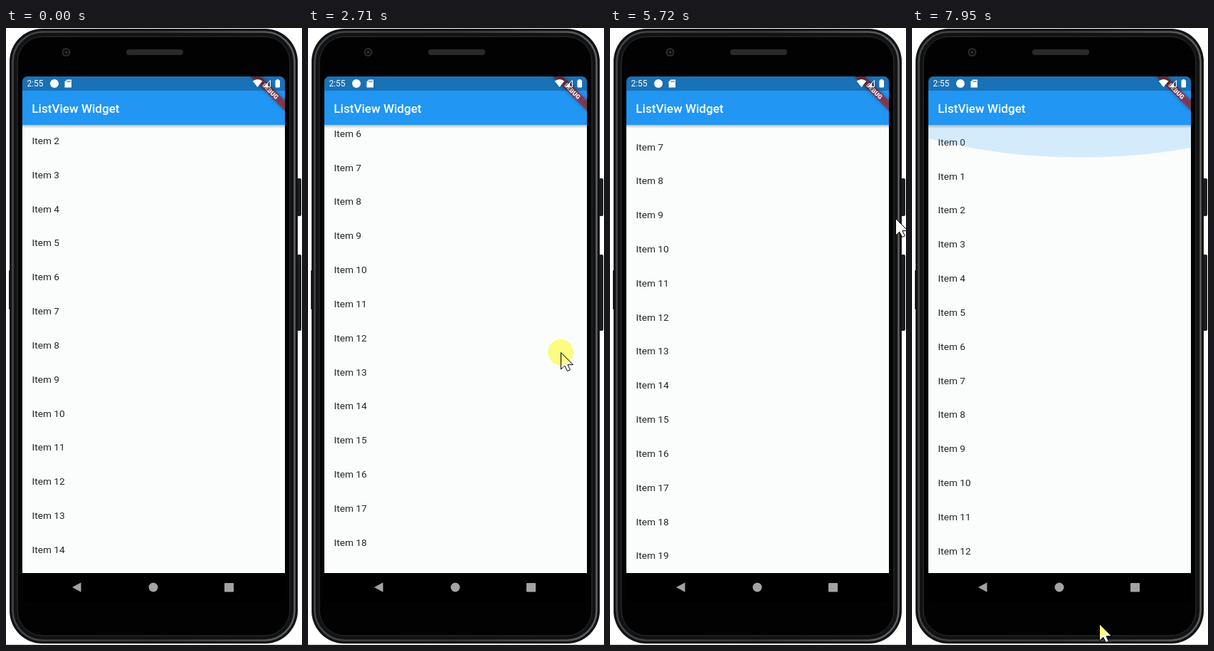
Write an HTML page with a canvas that moves like this. It is 416x866 px and loops after 8 s.

```html
<!DOCTYPE html>
<html lang="en">
<head>
<meta charset="utf-8">
<title>ListView Widget</title>
<style>
  html, body { margin: 0; width: 100%; height: 100%; overflow: hidden; background: #fff; }
  canvas { display: block; }
</style>
</head>
<body>
<canvas id="stage" width="416" height="866"></canvas>
<script>
const ctx = document.getElementById('stage').getContext('2d');
const LOOP = 8000, TICK = 77;
const DP = 0.854;
const LEFT = 23, RIGHT = 392, WIDTH = RIGHT - LEFT;
const TOP = 68, LIST_TOP = 136, LIST_BOTTOM = 765;
const PITCH = 47.83, ITEMS = 20, MAX_SCROLL = 328;
const SLOP = 15.6, LAG = 40;

// Pointer paths: [time, x, y]; each one is visible from its first to its last time.
const passing = [[70, 378, 839], [115, 390, 828], [160, 420, 815]];
const swipeUp = [
  [305, 404, 709], [390, 385, 704], [470, 366, 699], [545, 358, 697], [2010, 358, 697],
  [2170, 356, 675], [2330, 355, 640], [2480, 355, 585], [2630, 355, 505], [2710, 355, 455],
  [2780, 366, 384], [2860, 376, 302], [2940, 388, 215], [3020, 400, 125], [3100, 424, 60]
];
const swipeDown = [
  [5705, 401, 267], [5730, 401, 267], [5785, 406, 272], [5945, 398, 262], [6100, 372, 232],
  [6245, 358, 220], [6550, 358, 220], [6640, 352, 240], [6710, 330, 298], [6790, 303, 365],
  [6870, 293, 415], [6950, 290, 460], [7020, 283, 528], [7100, 270, 590], [7180, 265, 658],
  [7250, 264, 720], [7330, 263, 781], [7410, 262, 826], [7480, 262, 833], [7640, 262, 834],
  [7800, 263, 836], [8000, 263, 836]
];

const clamp = (v, lo, hi) => Math.min(hi, Math.max(lo, v));

function along(path, t) {
  const i = clamp(path.findIndex(p => p[0] > t), 0, path.length - 1);
  if (t >= path[path.length - 1][0]) return path[path.length - 1].slice(1);
  if (i === 0) return path[0].slice(1);
  const a = path[i - 1], b = path[i], k = (t - a[0]) / (b[0] - a[0]);
  return [a[1] + (b[1] - a[1]) * k, a[2] + (b[2] - a[2]) * k];
}

function scrollAt(t) {
  if (t < 4500) {
    const moved = 697 - along(swipeUp, Math.max(t - LAG, 400 + 200))[1];
    return Math.min(MAX_SCROLL, 97.5 + Math.max(0, moved - SLOP));
  }
  const moved = along(swipeDown, Math.max(t - LAG, 6300))[1] - 220;
  return Math.max(0, MAX_SCROLL - Math.max(0, moved - SLOP));
}

// Overscroll strength: grows, holds, decays slowly, then recedes on release.
function glowLevel(t, start, full, decay, release) {
  if (t < start) return 0;
  const grow = 1 - (1 - clamp((t - start) / (full - start), 0, 1)) ** 2;
  const fade = (1 - clamp((Math.min(t, release) - decay) / 2000, 0, 1)) ** 2;
  const recede = (1 - clamp((t - release) / 600, 0, 1)) ** 2;
  return grow * fade * recede;
}

function box(x, y, w, h, r, color) {
  ctx.beginPath();
  ctx.roundRect(x, y, w, h, r);
  ctx.fillStyle = color;
  ctx.fill();
}

function disc(x, y, r, color) {
  ctx.beginPath();
  ctx.arc(x, y, r, 0, Math.PI * 2);
  ctx.fillStyle = color;
  ctx.fill();
}

function shape(points, color) {
  ctx.beginPath();
  points.forEach(([x, y]) => ctx.lineTo(x, y));
  ctx.closePath();
  ctx.fillStyle = color;
  ctx.fill();
}

function ring(inset, radius, width, color) {
  ctx.beginPath();
  ctx.roundRect(5 + inset, 1 + inset, 405 - 2 * inset, 863 - 2 * inset, radius);
  ctx.lineWidth = width;
  ctx.strokeStyle = color;
  ctx.stroke();
}

function label(text, x, y, size, color, weight = 400) {
  ctx.font = `${weight} ${size}px Roboto, sans-serif`;
  ctx.fillStyle = color;
  ctx.fillText(text, x, y);
}

function drawPhone() {
  ctx.fillStyle = '#fff';
  ctx.fillRect(0, 0, 416, 866);
  ctx.fillStyle = '#c8c8c8';
  ctx.fillRect(0, 865, 416, 1);
  box(409, 211, 6, 53, 2, '#1c1d1f');
  box(409, 318, 6, 107, 2, '#1c1d1f');
  box(4, 340, 3, 55, 1, '#222');
  box(5, 1, 405, 863, 46, '#111213');
  const rim = ctx.createLinearGradient(5, 0, 410, 0);
  rim.addColorStop(0, '#454648');
  rim.addColorStop(0.5, '#3a3b3d');
  rim.addColorStop(1, '#606264');
  ring(4.5, 42, 2.5, rim);
  ring(11, 36, 1, '#2b2c2e');
  box(17, 13, 381, 839, 34, '#020202');
  disc(84.5, 34, 6, '#2c2d2f');
  disc(84.5, 34, 4, '#0c0d0e');
  disc(84.5, 34, 1.5, '#3a3b3d');
  box(169, 30, 80, 8, 4, '#2a2a2b');
}

function drawGlow(level, displacement, atBottom) {
  if (level <= 0.01) return;
  const radius = WIDTH * 1.5;
  const height = WIDTH * 0.75 * (2 - Math.sqrt(3));
  ctx.save();
  ctx.translate(LEFT, atBottom ? LIST_BOTTOM : LIST_TOP);
  ctx.scale(1, (atBottom ? -1 : 1) * 0.86 * level);
  ctx.beginPath();
  ctx.rect(0, 0, WIDTH, height);
  ctx.clip();
  disc(WIDTH / 2 * (0.5 + displacement), height - radius, radius,
    `rgba(33,150,243,${0.247 * level})`);
  ctx.restore();
}

function drawList(t) {
  ctx.save();
  ctx.beginPath();
  ctx.rect(LEFT, LIST_TOP, WIDTH, LIST_BOTTOM - LIST_TOP);
  ctx.clip();
  ctx.fillStyle = '#fbfdfc';
  ctx.fillRect(LEFT, LIST_TOP, WIDTH, LIST_BOTTOM - LIST_TOP);
  const scroll = scrollAt(t);
  for (let n = 0; n < ITEMS; n++) {
    label('Item ' + n, 36.5, LIST_TOP + 28.7 + n * PITCH - scroll, 16 * DP, '#262727');
  }
  drawGlow(glowLevel(t, 2800, 3060, 3160, 3570), 1, true);
  drawGlow(glowLevel(t, 7120, 7480, 7640, LOOP), 0.66, false);
  const shade = ctx.createLinearGradient(0, LIST_TOP, 0, LIST_TOP + 5);
  shade.addColorStop(0, 'rgba(0,0,0,.24)');
  shade.addColorStop(1, 'rgba(0,0,0,0)');
  ctx.fillStyle = shade;
  ctx.fillRect(LEFT, LIST_TOP, WIDTH, 5);
  ctx.restore();
}

function drawBanner() {
  ctx.save();
  ctx.translate(RIGHT, TOP);
  ctx.rotate(Math.PI / 4);
  ctx.shadowColor = 'rgba(0,0,0,.5)';
  ctx.shadowBlur = 5;
  ctx.fillStyle = 'rgba(183,28,28,.63)';
  ctx.fillRect(-40 * DP, 28 * DP, 80 * DP, 12 * DP);
  ctx.shadowColor = 'transparent';
  ctx.textAlign = 'center';
  label('DEBUG', 0, 34 * DP + 3.1, 10.2 * DP, '#fff', 900);
  ctx.restore();
}

function drawStatusIcons() {
  label('2:55', 29.5, 82.3, 14 * DP, '#fff');
  disc(68, 78, 6, '#fff');
  shape([[85.5, 72.5], [92, 72.5], [92, 83.5], [82.5, 83.5], [82.5, 75.5]], '#fff');
  ctx.fillStyle = '#1970b6';
  for (let i = 0; i < 3; i++) ctx.fillRect(85.5 + i * 2, 74, 1, 2.2);

  ctx.beginPath();
  ctx.moveTo(353.5, 83);
  ctx.lineTo(346.7, 74.6);
  ctx.quadraticCurveTo(353.5, 69.4, 360.3, 74.6);
  ctx.closePath();
  ctx.fillStyle = '#fff';
  ctx.fill();

  ctx.beginPath();
  ctx.moveTo(371.5, 73.5);
  ctx.lineTo(371.5, 82.5);
  ctx.lineTo(362.5, 82.5);
  ctx.closePath();
  ctx.lineWidth = 1;
  ctx.strokeStyle = '#fff';
  ctx.stroke();
  shape([[368, 77], [368, 82.5], [362.5, 82.5]], '#fff');

  box(378.5, 73.2, 6.5, 10.3, 1, '#fff');
  ctx.fillRect(380.2, 72, 3, 2);
}

function drawScreen(t) {
  ctx.save();
  ctx.beginPath();
  ctx.roundRect(LEFT, TOP, WIDTH, 738, 7);
  ctx.clip();
  ctx.fillStyle = '#000';
  ctx.fillRect(LEFT, TOP, WIDTH, 738);
  ctx.fillStyle = '#2196f3';
  ctx.fillRect(LEFT, TOP, WIDTH, LIST_TOP - TOP);
  label('ListView Widget', 36.3, 118.6, 20 * DP, '#fff', 500);
  drawList(t);
  drawBanner();
  ctx.fillStyle = 'rgba(0,0,0,.25)';
  ctx.fillRect(LEFT, TOP, WIDTH, 20);
  drawStatusIcons();
  shape([[93, 785], [105.5, 778.3], [105.5, 791.7]], '#a3a3a3');
  disc(207, 785, 6.5, '#a3a3a3');
  box(307, 779, 13, 12.5, 1, '#a3a3a3');
  ctx.restore();
}

function drawPointer(path, t, pressed) {
  const [x, y] = along(path, t);
  ctx.save();
  ctx.translate(x + 0.5, y + 0.5);
  shape([[0, 0], [0, 23.5], [5.3, 18.6], [9, 26], [13, 24.3], [9.5, 17.2], [17, 17]], '#fff');
  ctx.lineWidth = 1;
  ctx.strokeStyle = '#000';
  ctx.stroke();
  if (pressed) {
    ctx.globalCompositeOperation = 'multiply';
    disc(-0.5, -0.5, 18, '#ffff84');
  }
  ctx.restore();
}

function draw(now) {
  const t = now % LOOP;
  // The screen updates in ticks, as a screen recorder samples it.
  const q = t < 300 ? t : Math.floor((t - 5) / TICK) * TICK + 15;
  drawPhone();
  drawScreen(q);
  for (const path of [passing, swipeUp, swipeDown]) {
    if (q >= path[0][0] && q < path[path.length - 1][0]) {
      const pressAt = path === swipeUp ? 1770 : path === swipeDown ? 6420 : LOOP;
      drawPointer(path, q, t >= pressAt);
    }
  }
}

const start = performance.now();
function frame() {
  draw(performance.now() - start);
  requestAnimationFrame(frame);
}
frame();
</script>
</body>
</html>
```
